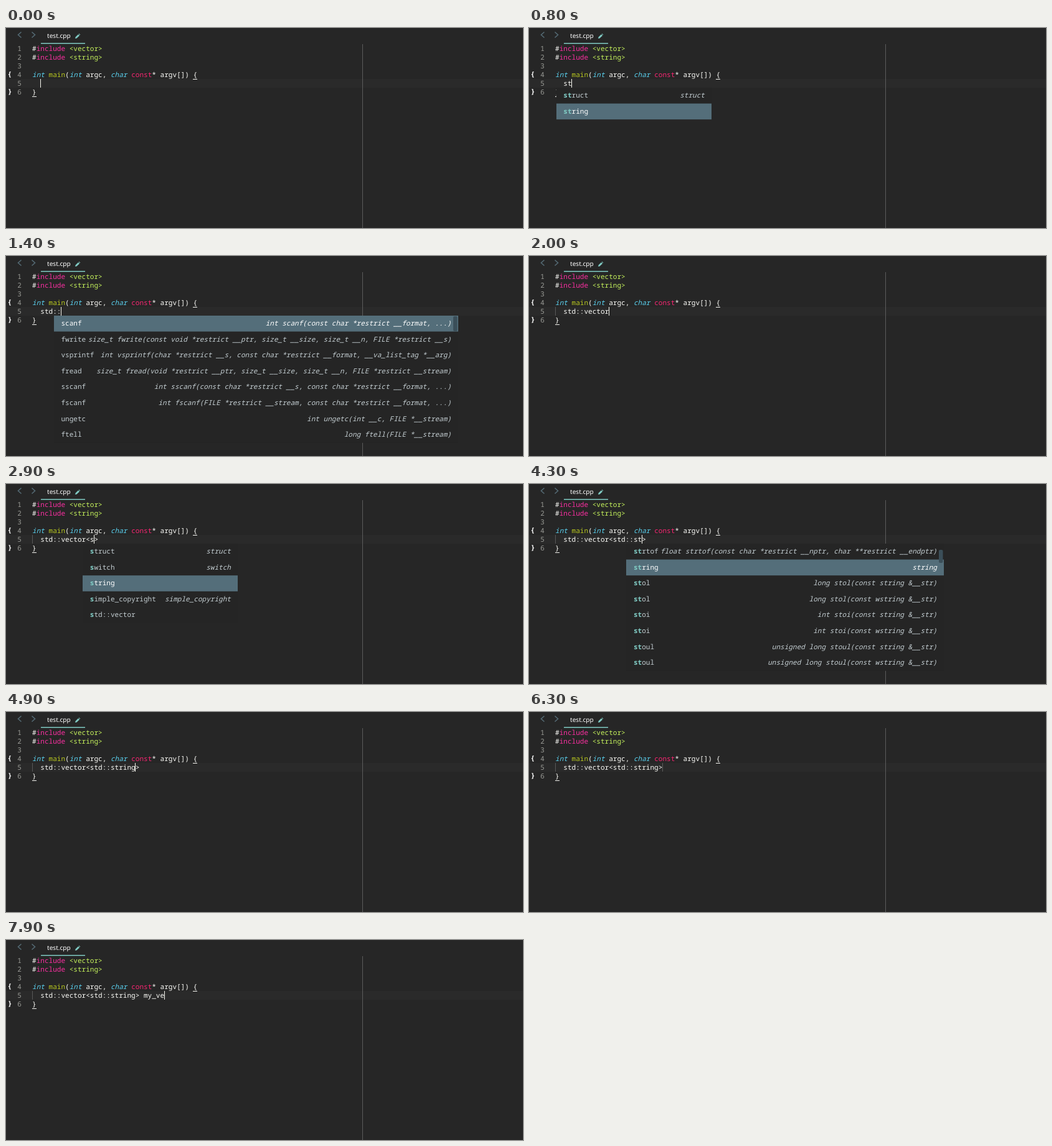
An HTML page for the animation above (8 s loop, 830x322 px).

```html
<!DOCTYPE html>
<html lang="en">
<head>
<meta charset="utf-8">
<title>Editor completion</title>
<style>
  html, body { margin: 0; width: 830px; height: 322px; overflow: hidden; background: #262626; }
  svg { display: block; }
  text {
    font: 500 11.05px "Noto Sans Mono", "DejaVu Sans Mono", monospace;
    white-space: pre;
    text-rendering: geometricPrecision;
    fill: #fcfcf8;
  }
  text.tab { font: 10.1px "Noto Sans", "Open Sans", sans-serif; fill: #fff; }
  .num { fill: #999a95; text-anchor: end; }
  text.brace { font-weight: 700; fill: #fff; }
  .pre { fill: #f92fa0; }
  .lib { fill: #c5f25c; }
  .type { fill: #5ad0ee; font-style: italic; }
  .fn { fill: #b9c81f; }
  .key { fill: #f92672; }
  .name { fill: #c3cdd1; }
  .sig { fill: #c3cdd1; font-style: italic; text-anchor: end; }
  .on { fill: #fff; }
  .hit { fill: #80cbc4; font-weight: 700; }
</style>
</head>
<body>
<svg id="stage" width="830" height="322" viewBox="0 0 830 322">
  <rect width="830" height="322" fill="#262626"/>
  <rect y="82" width="830" height="14" fill="#2a2a2a"/>
  <rect x="572" y="26" width="1" height="296" fill="#5c5c5c"/>
  <g fill="none" stroke="#546a74" stroke-width="1.6">
    <path d="M24.5 6.5L19.5 11L24.5 15.5"/>
    <path d="M41.5 6.5L46.5 11L41.5 15.5"/>
  </g>
  <text class="tab" x="66" y="16">test.cpp</text>
  <path d="M111 17L111.6 14.6L116 10.2L118 12.2L113.5 16.5ZM116.6 9.6L117.4 8.9L119.3 10.8L118.6 11.5Z" fill="#80cbc4"/>
  <rect x="56" y="24" width="71" height="1.5" fill="#80cbc4"/>
  <g id="code"></g>
  <g id="live"></g>
</svg>
<script>
const LOOP = 8000, CW = 6.63, LEFT = 42, INDENT = LEFT + 2 * CW;
const ROW = 25.6, TOP = 96;
const $ = id => document.getElementById(id);
const esc = s => s.replace(/&/g, "&amp;").replace(/</g, "&lt;").replace(/>/g, "&gt;");
const span = (cls, s) => `<tspan class="${cls}">${esc(s)}</tspan>`;
const text = (x, y, inner, cls = "") => `<text x="${x}" y="${y}" class="${cls}">${inner}</text>`;
const rect = (x, y, w, h, fill, extra = "") =>
  `<rect x="${x}" y="${y}" width="${w}" height="${h}" fill="${fill}" ${extra}/>`;
const baseline = n => 23 + 14 * n;

const scan = {
  scanf: ["scanf", "int scanf(const char *restrict __format, ...)"],
  fwrite: ["fwrite", "size_t fwrite(const void *restrict __ptr, size_t __size, size_t __n, FILE *restrict __s)"],
  vsprintf: ["vsprintf", "int vsprintf(char *restrict __s, const char *restrict __format, __va_list_tag *__arg)"],
  sscanf: ["sscanf", "int sscanf(const char *restrict __s, const char *restrict __format, ...)"],
  fscanf: ["fscanf", "int fscanf(FILE *restrict __stream, const char *restrict __format, ...)"]
};
const same = s => [s, s];
const words = [same("struct"), same("switch"), ["string", ""], same("simple_copyright")];
const sto = (name, type) =>
  ["string", "wstring"].map(s => [name, `${type} ${name}(const ${s} &__str)`]);

// col: column of the completed word; sel: selected row; bar: scroll thumb top
const popups = {
  s: { col: 0, w: 249, sel: 2, rows: words },
  st: { col: 0, w: 249, sel: 1, rows: [words[0], words[2]] },
  std: {
    col: 5, w: 649, sel: 0, bar: 97,
    rows: [scan.scanf, scan.fwrite, scan.vsprintf,
      ["fread", "size_t fread(void *restrict __ptr, size_t __size, size_t __n, FILE *restrict __stream)"],
      scan.sscanf, scan.fscanf,
      ["ungetc", "int ungetc(int __c, FILE *__stream)"],
      ["ftell", "long ftell(FILE *__stream)"]]
  },
  vec: {
    col: 5, w: 450, sel: 0, bar: 97,
    rows: [same("vector"), same("valarray"),
      ["vwscanf", "int vwscanf(const wchar_t *__format, va_list __arg)"],
      ["vwprintf", "int vwprintf(const wchar_t *__format, va_list __arg)"],
      same("void_t"), same("value_type"), same("variant"), same("visit")]
  },
  arg: { col: 12, w: 249, sel: 2, rows: [...words, ["std::vector", ""]] },
  argStd: { col: 12, w: 249, sel: 0, rows: [["std::vector", ""]] },
  inner: {
    col: 17, w: 649, sel: 0, bar: 97,
    rows: [["fseek", "int fseek(FILE *__stream, long __off, int __whence)"],
      same("wfstream"), same("iostream"),
      scan.scanf, scan.vsprintf, scan.sscanf, scan.fwrite, scan.fscanf]
  },
  innerSt: {
    col: 17, w: 510, sel: 1, bar: 106,
    rows: [["strtof", "float strtof(const char *restrict __nptr, char **restrict __endptr)"],
      same("string"), ...sto("stol", "long"), ...sto("stoi", "int"), ...sto("stoul", "unsigned long")]
  },
  m: { col: 25, w: 249, sel: 0, rows: [same("main"), same("map"), same("mutable"), same("memcpy")] }
};

const vec = "std::vector", full = vec + "<std::string>";
// time, text before caret, text after caret, popup, caret opacity
const steps = [
  [0, ""], [400, "s"], [500, "s", "", "s"], [700, "st", "", "st"],
  [900, "std"], [1000, "std:"], [1200, "std::"], [1400, "std::", "", "std"],
  [1600, "std::v", "", "std"], [1700, "std::v", "", "vec"], [1800, "std::ve", "", "vec"],
  [2000, vec], [2600, vec + "<", ">"], [2700, vec + "<s", ">"],
  [2800, vec + "<s", ">", "arg"], [3300, vec + "<std", ">", "argStd"],
  [3500, vec + "<std:", ">"], [3700, vec + "<std::", ">"],
  [3800, vec + "<std::", ">", "inner"], [4300, vec + "<std::st", ">", "innerSt"],
  [4800, vec + "<std::string", ">"],
  [5300, vec + "<std::string", ">", "", .66], [5400, vec + "<std::string", ">", "", .33],
  [5500, vec + "<std::string", ">", "", 0],
  [5800, full], [6300, full, "", "", .25], [6900, full + " "],
  [7100, full + " m"], [7200, full + " m", "", "m"],
  [7300, full + " my"], [7600, full + " my_"], [7800, full + " my_v"], [7900, full + " my_ve"]
];

function drawCode() {
  const include = lib => "#" + span("pre", "include") + " " + span("lib", `<${lib}>`);
  let out = "";
  for (let n = 1; n <= 6; n++) out += text(25, baseline(n), n, "num");
  out += text(2.5, baseline(4) - 1, "{", "brace") + text(3, baseline(6) - 1, "}", "brace");
  out += text(LEFT, baseline(1), include("vector")) + text(LEFT, baseline(2), include("string"));
  out += text(LEFT, baseline(4), span("type", "int") + " " + span("fn", "main") + "(" +
    span("type", "int") + " argc, " + span("type", "char") + " " + span("key", "const") + "* argv[]) {");
  out += text(LEFT, baseline(6), "}");
  out += rect(300, 82, 7, 1, "#f8f8f2") + rect(42, 110, 7, 1, "#f8f8f2");
  $("code").innerHTML = out;
}

function drawPopup({ col, w, sel, bar, rows }, typed) {
  const wordX = INDENT + col * CW, x = Math.round(wordX - 11.5);
  let out = rect(x, TOP, w, rows.length * ROW, "#252525");
  out += rect(x, TOP + sel * ROW, w, ROW, "#546e7a");
  if (bar) out += rect(x + w - 8, bar, 6.5, bar > 97 ? 21 : 24, "#3b4f59", 'rx="2"');
  rows.forEach(([name, sig], i) => {
    const y = TOP + i * ROW + 16, on = i === sel ? " on" : "";
    let hit = 0;
    while (hit < typed.length && name[hit] === typed[hit]) hit++;
    out += text(wordX, y, span("hit", name.slice(0, hit)) + esc(name.slice(hit)), "name" + on);
    out += text(x + w - 11, y, esc(sig), "sig" + on);
  });
  return out;
}

function draw([time, head, tail = "", key = "", caret = 1]) {
  const popup = popups[key];
  let out = time >= 2000 ? rect(42, 82, 1, 14, "#585858") : "";
  out += text(INDENT, baseline(5), esc(head + tail));
  out += rect(Math.floor(INDENT + head.length * CW), 82, 1, 14, "#f8f8f0", `opacity="${caret}"`);
  if (popup) out += drawPopup(popup, head.slice(popup.col));
  $("live").innerHTML = out;
}

let shown;
function tick() {
  const t = performance.now() % LOOP;
  const step = steps.findLast(s => s[0] <= t);
  if (step !== shown) draw(shown = step);
  requestAnimationFrame(tick);
}
drawCode();
tick();
</script>
</body>
</html>
```
